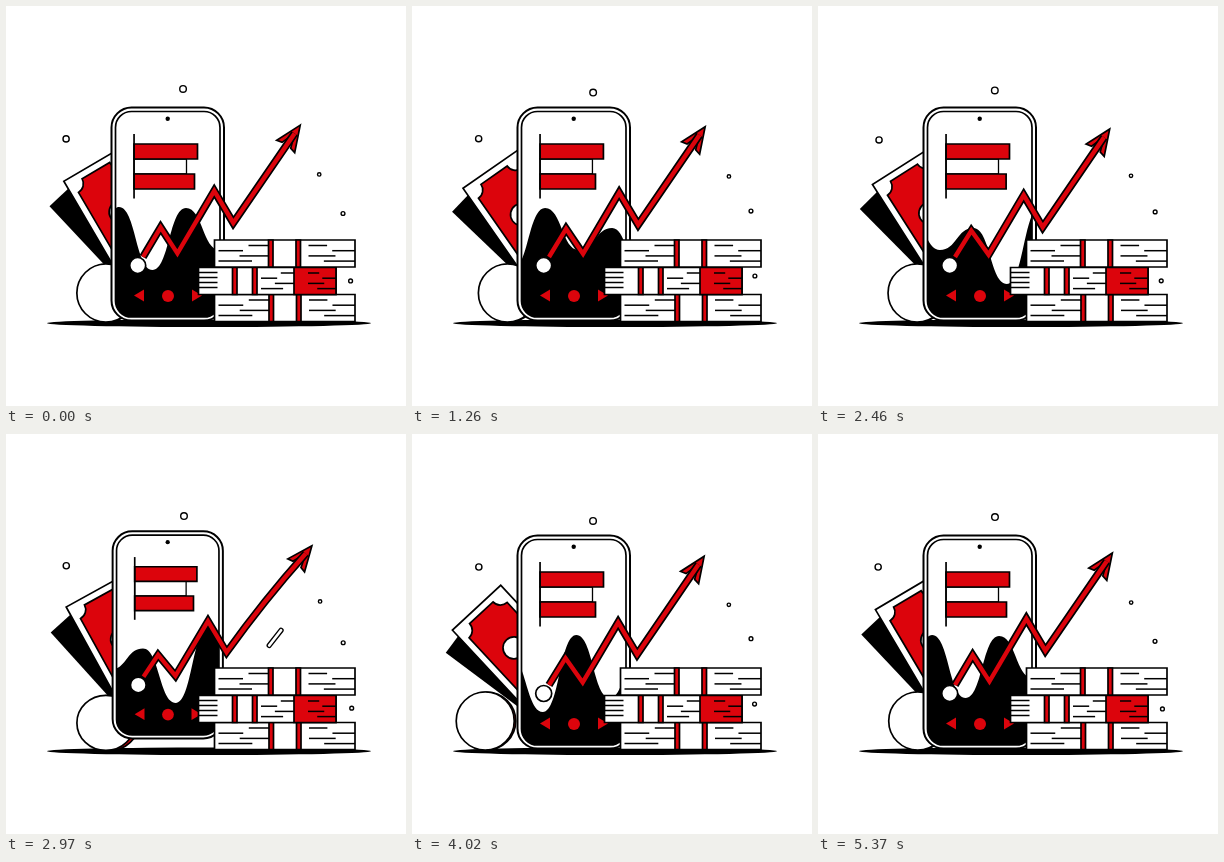
An HTML page with a canvas for the animation above (5.4 s loop, 400 px wide and 400 px high).

```html
<!DOCTYPE html>
<html lang="en">
<head>
<meta charset="utf-8">
<title>Phone, chart and cash</title>
<style>
  html, body { margin: 0; width: 100%; height: 100%; overflow: hidden; background: #fff; }
  canvas { display: block; width: 400px; height: 400px; }
</style>
</head>
<body>
<canvas id="stage" width="400" height="400"></canvas>
<script>
const c = document.getElementById('stage').getContext('2d');
const LOOP = 5400, LEAP = 2940, LAND = 3540;
const RED = '#dc040c', BLACK = '#000', WHITE = '#fff', TAU = Math.PI * 2;
const rad = deg => deg * Math.PI / 180;

// Timing rules: eased step from 0 to 1, eased bump, and a steady swing.
const ramp = (t, from, to) => {
  const u = Math.min(1, Math.max(0, (t - from) / (to - from)));
  return (1 - Math.cos(Math.PI * u)) / 2;
};
const bump = (t, peak, half) => 1 - ramp(Math.abs(t - peak), 0, half);
const swing = (t, peak, rounds = 2) => Math.cos(TAU * rounds * (t - peak) / LOOP);

// Objects knocked aside by the landing slide back before the loop ends.
const knock = t => ramp(t, LAND - 120, LAND + 30) * (1 - ramp(t, 4500, LOOP));

function paint(fill, width = 1.7) {
  if (fill) { c.fillStyle = fill; c.fill(); }
  if (width) { c.strokeStyle = BLACK; c.lineWidth = width; c.stroke(); }
}

function poly(points, fill, width) {
  c.beginPath();
  points.forEach(p => c.lineTo(...p));
  c.closePath();
  paint(fill, width);
}

function oval(x, y, rx, ry, fill, width) {
  c.beginPath();
  c.ellipse(x, y, rx, ry, 0, 0, TAU);
  paint(fill, width);
}

function box(x, y, w, h, fill, width, r = 0) {
  c.beginPath();
  c.roundRect(x, y, w, h, r);
  paint(fill, width);
}

function star(x, y, outer, inner, spikes, turn, fill) {
  const pts = [];
  for (let i = 0; i < spikes * 2; i++) {
    const r = i % 2 ? inner : outer, a = turn + i * Math.PI / spikes;
    pts.push([x + r * Math.cos(a), y + r * Math.sin(a)]);
  }
  poly(pts, fill, 1.3);
}

function turned(x, y, angle, draw) {
  c.save();
  c.translate(x, y);
  c.rotate(angle);
  draw();
  c.restore();
}

function notes(t) {
  const sway = swing(t, 390), k = knock(t);
  turned(144, 265, rad(3 * sway - 45 - 6.5 * k), () => box(-29, -116, 66, 112, BLACK, 0));
  turned(144, 265, rad(4.3 * sway - 33 - 7.5 * k), () => {
    box(-29, -121, 66, 117, WHITE);
    const l = -22, r = 30, top = -114, bottom = -12, n = 10, q = Math.PI / 2;
    c.beginPath();
    c.arc(l, top, n, q, 0, true);
    c.arc(r, top, n, 2 * q, q, true);
    c.arc(r, bottom, n, -q, -2 * q, true);
    c.arc(l, bottom, n, 0, -q, true);
    c.closePath();
    paint(RED);
    oval(4, -66, 11, 11, WHITE);
  });
}

function coin(t) {
  const x = 97.5 + 2.5 * swing(t, 150) - 22 * knock(t);
  const crouch = bump(t, LEAP, 200), squash = bump(t, LAND + 30, 150);
  const y = 287 + 2 * crouch - squash, ry = 29 - 1.5 * crouch - 2.5 * squash;
  oval(x + 1.5 + 2.5 * crouch, y, 29, ry, RED);
  oval(x, y, 29, ry, WHITE);
}

// Rolling hills: one 201 px strip of crests and troughs that scrolls left.
function hills(t) {
  const heights = [202, 244, 222, 278, 201, 264], half = 33.5;
  let x = 180 - 402 - t / LOOP * 201, y = heights[0];
  c.beginPath();
  c.moveTo(x, 330);
  c.lineTo(x, y);
  for (let i = 1; i < 20; i++) {
    const next = heights[i % 6];
    c.bezierCurveTo(x + half / 2, y, x + half / 2, next, x + half, next);
    x += half;
    y = next;
  }
  c.lineTo(x, 330);
  c.closePath();
  paint(BLACK, 0);
}

function bars(t) {
  const dip = bump(t, 1740, 500);
  box(128, 153, 52.5 - 14 * dip, 15, WHITE, 1.3);
  box(128, 138, 63.5 - 20 * dip, 15, RED);
  box(128, 168, 58 + 2.5 * swing(t, 0) - 19 * dip, 15, RED);
  box(127.2, 128, 1.7, 64.5, BLACK, 0);
}

function arrow(t) {
  const reach = ramp(t, LEAP - 190, LEAP + 110) * (1 - ramp(t, LAND + 60, LAND + 360));
  const k = swing(t, 1680, 3) - .5 * swing(t, 0, 1) - 2 * reach;
  const tx = 293 + 3 * k + 24 * reach, ty = 121 - 4.5 * k - 13 * reach;
  const ex = 226 + 3 * k, ey = 219 - 5 * k;
  const back = Math.atan2(ey - ty, ex - tx);
  const at = (d, deg) => [tx + d * Math.cos(back + rad(deg)), ty + d * Math.sin(back + rad(deg))];
  const [hx, hy] = at(10, 0);
  const head = () => poly([at(0, 0), at(28, 23), at(25, 12), at(14, 6), at(14, -6), at(25, -12), at(28, -23)], RED);
  head();
  c.beginPath();
  c.moveTo(137, 251);
  c.lineTo(154 + 1.5 * k, 223 - 4 * k);
  c.lineTo(171 + k, 248 - 1.5 * k);
  c.lineTo(207 + 3 * k, 187 - 5 * k);
  c.lineTo(ex, ey);
  c.quadraticCurveTo((ex + hx) / 2 - 3 * reach, (ey + hy) / 2 - 3 * reach, hx, hy);
  for (const [color, width] of [[BLACK, 7.8], [RED, 4.4]]) {
    c.strokeStyle = color;
    c.lineWidth = width;
    c.stroke();
  }
}

function phone(t) {
  const u = (2 * t - LEAP - LAND) / (LAND - LEAP);
  const jump = 53 * Math.max(0, 1 - u * u);
  const crouch = bump(t, LEAP - 60, 180), squash = bump(t, LAND + 30, 150);
  c.save();
  c.translate(161.7, 315 - jump);
  c.scale(1 + .025 * squash - .02 * bump(t, LEAP + 30, 150), 1 - .055 * crouch - .047 * squash);
  c.translate(-161.7, -315);
  box(105.5, 101.5, 112.5, 213, WHITE, 2, 20);
  c.save();
  box(109.5, 105.5, 104.5, 205.5, WHITE, 0, 16);
  c.clip();
  hills(t);
  c.restore();
  box(109.5, 105.5, 104.5, 205.5, null, 1.7, 16);
  oval(161.7, 112.7, 2.2, 2.2, BLACK, 0);
  bars(t);
  for (const s of [-1, 1]) {
    const x = 162 + 24 * s;
    poly([[x + 10 * s, 289.5], [x, 283.5], [x, 295.5]], RED, 0);
  }
  oval(162, 290, 6, 6, RED, 0);
  arrow(t);
  oval(131.7, 259.5, 8, 8, WHITE);
  c.restore();
}

// A wad of notes in a band from a to b; side 1 or -1 is the loose end.
function wad(x0, x1, y, a, b, side, lift, redFrom) {
  const h = 27;
  const shift = x => {
    const p = side > 0 ? (x - b) / (x1 - b) : (a - x) / (a - x0);
    return .7 * lift * Math.max(0, p) ** 2 - lift;
  };
  const trace = (from, to, ly) => {
    for (let i = 0; i <= 12; i++) {
      const x = from + (to - from) * i / 12;
      c.lineTo(x, ly + shift(x));
    }
  };
  const slab = (from, to, fill) => {
    c.beginPath();
    trace(from, to, y);
    trace(to, from, y + h);
    c.closePath();
    paint(fill);
  };
  const mark = (from, to, dy) => {
    c.beginPath();
    trace(from, to, y + dy);
    paint(null, 1.5);
  };
  // Page edges start in turn at the inner and the outer end.
  const pages = (inner, outer) => {
    for (let i = 0; i < 4; i++) {
      const from = i % 2 ? outer : inner, len = (outer - inner) * (.4 + .09 * i);
      mark(from, from + (i % 2 ? -len : len), 5.5 + 5.2 * i);
    }
  };
  slab(x0, x1, WHITE);
  if (redFrom) slab(redFrom, x1, RED);
  slab(a, a + 4.5, RED);
  slab(b - 4.5, b, RED);
  if (redFrom) {
    for (let i = 0; i < 4; i++) mark(x0, x0 + 19, 5 + 5 * i);
    pages(redFrom, b + 4);
    pages(redFrom + 14, x1);
  } else {
    pages(a, x0 + 4);
    pages(b + 8, x1);
  }
}

function cash(t) {
  const lift = bump(t, LAND + 30, 120) + .3 * bump(t, LAND + 240, 90);
  wad(208.5, 349, 288.5, 263, 295, 1, 1.5 * lift);
  wad(192.5, 330, 261.5, 226.5, 251, -1, 3 * lift, 288);
  wad(208.5, 349, 234, 262.5, 294.5, 1, 4 * lift);
}

// Small rings drifting on ellipses, two rounds per loop.
function rings(t) {
  const ring = (x, y, r, ax, px, ay, py) =>
    oval(x + ax * swing(t, px), y + ay * swing(t, py), r, r, WHITE, 1.4);
  ring(63.5, 133, 3.1, -3.5, 100, -2, 650);
  ring(179, 85, 3.3, -2.2, -200, -3, 350);
  ring(315, 169.7, 1.7, -2, -200, -2.5, 450);
  ring(338, 206, 1.9, -1, 0, 3, 450);
  ring(343.5, 272.5, 1.9, 2.5, 480, 2.5, -100);
}

function sparks(t) {
  const p = (t - LEAP + 60) / 240;
  if (p > 0 && p < 1) {
    const len = 23 * Math.sin(Math.PI * p) + 2;
    turned(259 + 27 * p, 217 - 35 * p, rad(-52), () => box(-len / 2, -2, len, 4, WHITE, 1.3, 2));
  }
  const glow = bump(t, LAND + 60, 240);
  if (glow > .02) {
    star(103, 125, 28 * glow, 7 * glow, 8, rad(4), RED);
    star(318, 227.5, 16.5 * glow, 3.2 * glow, 4, 0, WHITE);
  }
}

function frame(now) {
  const t = Math.floor(now % LOOP / 30) * 30;
  c.fillStyle = WHITE;
  c.fillRect(0, 0, 400, 400);
  oval(203, 317.2, 162, 3.8, BLACK, 0);
  notes(t);
  coin(t);
  phone(t);
  cash(t);
  rings(t);
  sparks(t);
}

const start = performance.now();
(function tick() {
  frame(performance.now() - start);
  requestAnimationFrame(tick);
})();
</script>
</body>
</html>
```
